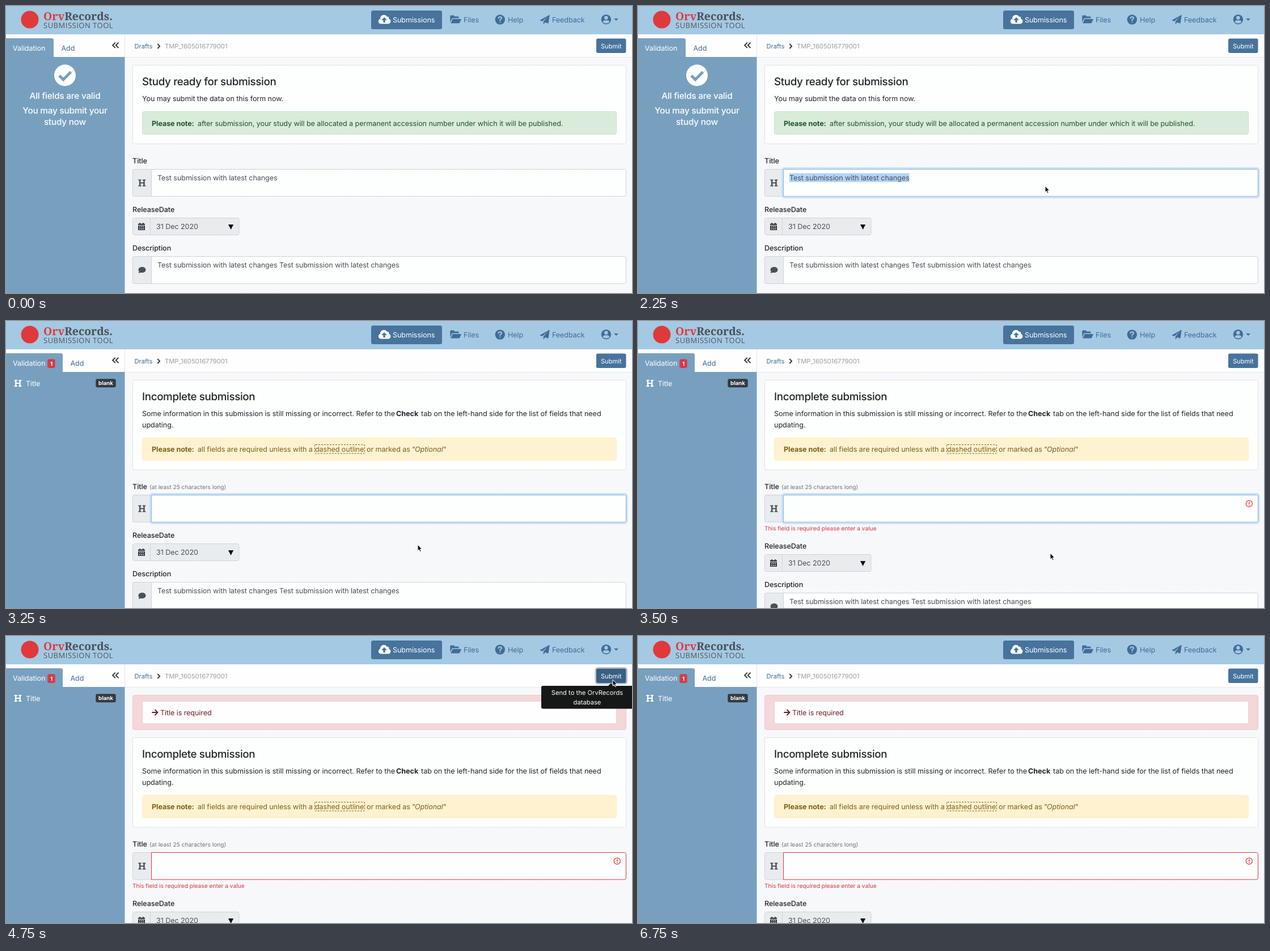
Write an HTML page that moves like this. It is 1104x507 px and loops after 7 s.

```html
<!DOCTYPE html>
<html lang="en">
<head>
<meta charset="utf-8">
<title>Submission form</title>
<style>
  html, body { margin: 0; width: 100%; height: 100%; overflow: hidden; background: #f8f9fb; }
  svg { display: block; width: 100%; height: 100%; }
  text { font: 400 12.6px Inter, Roboto, sans-serif; letter-spacing: -.09px; font-optical-sizing: none;
         text-rendering: geometricPrecision; fill: #212529; white-space: pre; }
  .label { font-weight: 500; }
  .bold { font-weight: 700; }
  .para { letter-spacing: -.045px; }
  .head { font-size: 18.8px; font-weight: 500; letter-spacing: -.37px; }
  .side { font-size: 15.3px; font-weight: 500; letter-spacing: -.2px; fill: #fff; text-anchor: middle; }
  .mid { font-size: 11.2px; letter-spacing: 0; }
  .small { font-size: 10.2px; letter-spacing: 0; }
  .tiny { font-size: 9.6px; font-weight: 700; letter-spacing: 0; fill: #fff; }
  .value { fill: #495057; }
  .navy { fill: #3f6d97; }
  .white { fill: #fff; }
  .green { fill: #23522f; }
  .amber { fill: #7d6216; }
  .panel { fill: #fdfefe; stroke: #dfe2e5; }
  .field { fill: #fdfefe; stroke: #ced4da; }
  .addon { fill: #e9ecef; stroke: #ced4da; }
  .line { fill: none; stroke-linecap: round; stroke-linejoin: round; }
</style>
</head>
<body>
<svg viewBox="0 0 1104 507" preserveAspectRatio="none">
  <defs>
    <pattern id="weave" width="8" height="8" patternUnits="userSpaceOnUse">
      <path d="M0 4L4 0M4 8L8 4M1 5L3 7M5 1L7 3" stroke="#f2f4f6" stroke-width=".7"/>
    </pattern>
    <path id="heading" d="M0 0H5.4V1.8H4V5.1H9V1.8H7.6V0H13V1.8H11.4V10.2H13V12H7.6V10.2H9V6.9H4V10.2H5.4V12H0V10.2H1.6V1.8H0Z"/>
  </defs>
  <rect width="1104" height="507" fill="#f8f9fb"/>
  <rect x="210" y="91" width="894" height="416" fill="url(#weave)"/>

  <!-- form -->
  <g id="danger">
    <rect x="223.5" y="104.5" width="870" height="61" rx="3" fill="#f4d7d9" stroke="#efc9cc"/>
    <rect x="240.5" y="115.5" width="836" height="39" rx="3" fill="#fefefe" stroke="#e6d9da"/>
    <path class="line" d="M258 135H267M263 130.5L267.5 135L263 139.5" stroke="#6f1d25" stroke-width="1.8"/>
    <text x="272" y="139.6" style="fill:#6f1d25">Title is required</text>
  </g>
  <g id="ready">
    <rect class="panel" x="223.5" y="104.5" width="870" height="139" rx="3"/>
    <text class="head" x="240" y="139.8">Study ready for submission</text>
    <text x="240" y="168">You may submit the data on this form now.</text>
    <rect x="240.5" y="186.5" width="836" height="40" rx="3" fill="#d9ecdb" stroke="#c5e3ca"/>
    <text class="green" y="211.5"><tspan class="bold" x="257">Please note:</tspan><tspan x="338">after submission, your study will be allocated a permanent accession number under which it will be published.</tspan></text>
  </g>
  <g id="incomplete">
    <rect class="panel" x="223.5" y="104.5" width="870" height="158.5" rx="3"/>
    <text class="head" x="240" y="139.8">Incomplete submission</text>
    <text class="para" y="168"><tspan x="240">Some information in this submission is still missing or incorrect. Refer to the</tspan><tspan class="bold" x="688">Check</tspan><tspan x="732">tab on the left-hand side for the list of fields that need</tspan><tspan x="240" y="187.7">updating.</tspan></text>
    <rect x="240.5" y="206.5" width="836" height="39.5" rx="3" fill="#fef2d1" stroke="#fdecbd"/>
    <text class="amber" y="230.8"><tspan class="bold" x="257">Please note:</tspan><tspan x="338">all fields are required unless with a</tspan><tspan x="545">dashed outline</tspan><tspan x="636">or marked as "</tspan><tspan x="721" font-style="italic">Optional</tspan><tspan x="771">"</tspan></text>
    <rect x="544.5" y="218.5" width="88" height="15.5" rx="1.5" fill="none" stroke="#7d6216" stroke-dasharray="3 2"/>
  </g>

  <g id="titleGroup">
    <text class="label" x="223" y="278">Title</text>
    <text id="hint" class="small" x="253" y="278" style="fill:#6c757d">(at least 25 characters long)</text>
    <rect class="addon" x="223.5" y="288.5" width="40" height="47.7" rx="3"/>
    <use href="#heading" x="233.3" y="306.5" fill="#495057"/>
    <rect id="ring" x="254.5" y="286.5" width="840.5" height="51.7" rx="4" fill="none" stroke="#cbdff8" stroke-width="3"/>
    <path id="titleBox" class="field" d="M256.5 288.5H1090.5Q1093.5 288.5 1093.5 291.5V333.2Q1093.5 336.2 1090.5 336.2H256.5Z"/>
    <rect id="selection" x="267" y="295.5" height="15.5" fill="#b2d3f8"/>
    <text id="titleText" class="value" x="267" y="307.7">Test submission with latest changes</text>
    <rect id="caret" x="266.5" y="296.5" width="1" height="14.5" fill="#495057"/>
    <g id="error">
      <circle cx="1077.8" cy="303.7" r="5.6" fill="none" stroke="#d8383f" stroke-width="1.3"/>
      <path d="M1077.8 300.4V304.6M1077.8 305.8V307.2" stroke="#d8383f" stroke-width="1.5"/>
      <text class="small" x="223" y="351.3" style="fill:#d63640">This field is required please enter a value</text>
    </g>
  </g>

  <g id="rest">
    <text class="label" x="223" y="364">ReleaseDate</text>
    <rect class="addon" x="223.5" y="374.5" width="187.5" height="30" rx="3"/>
    <path d="M254.5 374.5V404.5" stroke="#ced4da"/>
    <g fill="#343a40">
      <path d="M235.2 383H237V384.5H241V383H242.8V384.5H245V387H233V384.5H235.2ZM233 388H245V396H233Z"/>
      <path d="M235 390H243M235 393.6H243" stroke="#e9ecef" stroke-width="1.7" stroke-dasharray="1.8 1.3"/>
    </g>
    <text class="value" x="265" y="394">31 Dec 2020</text>
    <path d="M392 386H401.2L396.6 395Z" fill="#111"/>
    <text class="label" x="223" y="432">Description</text>
    <rect class="field" x="223.5" y="442.5" width="870" height="48" rx="3"/>
    <path class="addon" d="M256.5 442.5H226.5Q223.5 442.5 223.5 445.5V487.5Q223.5 490.5 226.5 490.5H256.5Z"/>
    <path d="M240 461C236 461 233.5 463.2 233.5 466C233.5 467.3 234 468.4 234.8 469.3Q234.5 470.8 233.5 472Q235.8 472 237.3 470.8Q238.6 471.2 240 471.2C243.8 471.2 246.5 469 246.5 466S243.8 461 240 461Z" fill="#495057"/>
    <text class="value" x="267" y="462">Test submission with latest changes Test submission with latest changes</text>
  </g>

  <!-- breadcrumb bar -->
  <rect y="50" width="1104" height="40.5" fill="#fefefe"/>
  <path d="M210 90.5H1104M209.5 50V90" stroke="#e3e6e8"/>
  <text class="mid navy" x="226.5" y="75">Drafts</text>
  <path class="line" d="M267.8 67.5L271.2 71L267.8 74.5" stroke="#343a40" stroke-width="1.8"/>
  <text class="mid" x="280" y="75" style="fill:#979da3">TMP_1605016779001</text>
  <rect id="submitRing" x="1039.8" y="56.3" width="55" height="28" rx="4" fill="none" stroke="#b3c6d7" stroke-width="2.6"/>
  <rect id="submit" x="1041" y="57.5" width="52.5" height="25.5" rx="3"/>
  <text class="mid white" x="1067.3" y="74.8" text-anchor="middle">Submit</text>

  <!-- sidebar -->
  <rect y="90" width="209.5" height="417" fill="#77a0bf"/>
  <path id="tab" fill="#77a0bf"/>
  <text class="white" x="12" y="78.6">Validation</text>
  <text id="add" class="navy" y="78.6">Add</text>
  <path class="line" d="M192.3 65.2L188 69.4L192.3 73.6M198 65.2L193.7 69.4L198 73.6" stroke="#212529" stroke-width="1.7"/>
  <g id="valid">
    <circle cx="104" cy="122.5" r="19" fill="#fff"/>
    <path d="M94 123L101 130L114.5 116.5" fill="none" stroke="#77a0bf" stroke-width="4.8"/>
    <text class="side" x="104" y="164">All fields are valid</text>
    <text class="side" x="104" y="190">You may submit your</text>
    <text class="side" x="104" y="209.5">study now</text>
  </g>
  <g id="invalid">
    <rect x="73.3" y="67.3" width="13.4" height="15.6" rx="3" fill="#d63b47"/>
    <text class="tiny" x="80" y="78.8" text-anchor="middle">1</text>
    <use href="#heading" x="14.5" y="104" fill="#fff"/>
    <text class="white" x="35" y="114.6">Title</text>
    <rect x="158.3" y="102.3" width="35.4" height="15" rx="3" fill="#343a40"/>
    <text class="tiny" x="176" y="113.2" text-anchor="middle">blank</text>
  </g>

  <!-- header -->
  <rect width="1104" height="50" fill="#a4c9e3"/>
  <circle cx="42" cy="24" r="15.5" fill="#e0393b"/>
  <text x="66" y="25.3" style="font:700 19.4px 'Noto Serif',serif;letter-spacing:0;fill:#4a4f55"><tspan style="fill:#e0393b">Orv</tspan>Records.</text>
  <text x="66" y="38.6" style="font:400 13px 'Open Sans',sans-serif;letter-spacing:.5px;fill:#50565c">SUBMISSION TOOL</text>
  <rect x="644" y="8" width="125" height="33" rx="3.5" fill="#47739c"/>
  <path class="white" d="M661.5 31.5C658.5 31.5 656.8 29.4 656.8 27C656.8 24.8 658.2 23.1 660 22.5C660 18.6 662.8 15.8 666.4 15.8C669 15.8 670.7 17 671.8 18.9C674.6 18.4 676 20.6 675.4 23.1C677.4 23.6 678.4 25.3 678.4 27.2C678.4 29.7 676.6 31.5 674 31.5Z"/>
  <path d="M667 20L672 25H668.7V29.3H665.3V25H662Z" fill="#47739c"/>
  <text class="white" x="682" y="29">Submissions</text>
  <g class="navy">
    <path d="M783.3 29V18Q783.3 16.5 784.8 16.5H789.5L791.6 18.6H797.2Q798.6 18.6 798.6 20V21.6H788Q786.9 21.6 786.3 22.6ZM784.3 30.5L787.4 23.8Q787.8 23 788.6 23H802.2Q803.3 23 802.8 24L800 29.7Q799.6 30.5 798.8 30.5Z"/>
    <text class="navy" x="807" y="29">Files</text>
    <circle cx="871.3" cy="24" r="8.7"/>
    <path class="line" d="M868.6 21.6C868.8 18.5 874 18.6 874 21.6C874 23.5 871.3 23.5 871.3 25.4M871.3 28.4V28.5" stroke="#a4c9e3" stroke-width="2"/>
    <text class="navy" x="885" y="29">Help</text>
    <path d="M958.8 15.4L956.4 31L950.8 28.8L947.8 32.8V27.6L955.5 18.6L945.8 27L941.2 25.2Z"/>
    <text class="navy" x="963" y="29">Feedback</text>
    <circle cx="1058.4" cy="23.7" r="8.7"/>
    <circle cx="1058.4" cy="20.7" r="3.2" fill="#a4c9e3"/>
    <path d="M1052.6 28.4Q1053.4 25.3 1056 25.3H1060.8Q1063.4 25.3 1064.2 28.4Q1058.4 33 1052.6 28.4Z" fill="#a4c9e3"/>
    <path d="M1072.2 22H1080L1076.1 26Z"/>
  </g>

  <g id="tooltip">
    <path d="M947 88H1062L1067 83.5L1072 88H1106V128.5H947Q944 128.5 944 125.5V91Q944 88 947 88Z" fill="#161717"/>
    <text class="mid white" x="1025" y="104" text-anchor="middle">Send to the OrvRecords</text>
    <text class="mid white" x="1025" y="121" text-anchor="middle">database</text>
  </g>
  <path id="cursor" d="M0 0V11.2L2.5 8.9L4.2 12.7L6.1 11.8L4.4 8.1H7.7Z" fill="#111" stroke="#fff" stroke-width="1"/>
</svg>
<script>
  const STEP = 250, LOOP = 7000;
  const el = Object.fromEntries([...document.querySelectorAll("svg [id]")].map(n => [n.id, n]));

  // [step, x, y]: the pointer rests at each place until the next one
  const stops = [
    [1, 801, 63], [2, 745, 180], [3, 700, 285], [4, 686, 314], [6, 705, 317], [7, 718, 318],
    [12, 721, 345], [13, 726, 395], [14, 727, 410], [15, 900, 260], [16, 1064, 74], [17, 1070, 77],
    [20, 965, 135], [21, 820, 160], [22, 640, 150], [23, 470, 140], [24, 365, 138], [25, 500, 1],
    [26, 0, -40]
  ];

  const show = (node, on) => node.setAttribute("visibility", on ? "visible" : "hidden");
  const move = (node, x, y) => node.setAttribute("transform", `translate(${x} ${y})`);
  el.selection.setAttribute("width", el.titleText.getComputedTextLength());

  function render(ms) {
    const step = Math.floor(ms % LOOP / STEP);
    const within = (from, to) => step >= from && step < to;
    const blank = step >= 10, error = step >= 14, alert = step >= 19;
    const focus = within(8, 15);
    const noteHeight = blank ? 19 : 0, errorHeight = error ? 19 : 0, alertHeight = alert ? 75 : 0;

    show(el.valid, !blank);
    show(el.ready, !blank);
    show(el.titleText, !blank);
    show(el.invalid, blank);
    show(el.incomplete, blank);
    show(el.hint, blank);
    show(el.error, error);
    show(el.danger, alert);
    show(el.ring, focus);
    show(el.selection, step === 9);
    show(el.caret, step === 8 || within(10, 12));
    show(el.submitRing, within(19, 27));
    show(el.tooltip, within(18, 20));

    const tabEnd = blank ? 100 : 84;
    el.tab.setAttribute("d", `M0 57H${tabEnd - 3}Q${tabEnd} 57 ${tabEnd} 60V90.5H0Z`);
    el.add.setAttribute("x", tabEnd + 13.5);
    el.titleBox.style.stroke = focus ? "#86b4ee" : error ? "#d8383f" : "";
    el.submit.setAttribute("fill", within(16, 27) ? "#3a5f82" : "#47739c");

    move(el.incomplete, 0, alertHeight);
    move(el.titleGroup, 0, noteHeight + alertHeight);
    move(el.rest, 0, noteHeight + errorHeight + alertHeight);

    const stop = stops.filter(s => s[0] <= step).pop();
    show(el.cursor, stop);
    if (stop) move(el.cursor, stop[1], stop[2]);
  }

  const start = performance.now();
  function tick() {
    render(performance.now() - start);
    requestAnimationFrame(tick);
  }
  tick();
</script>
</body>
</html>
```
